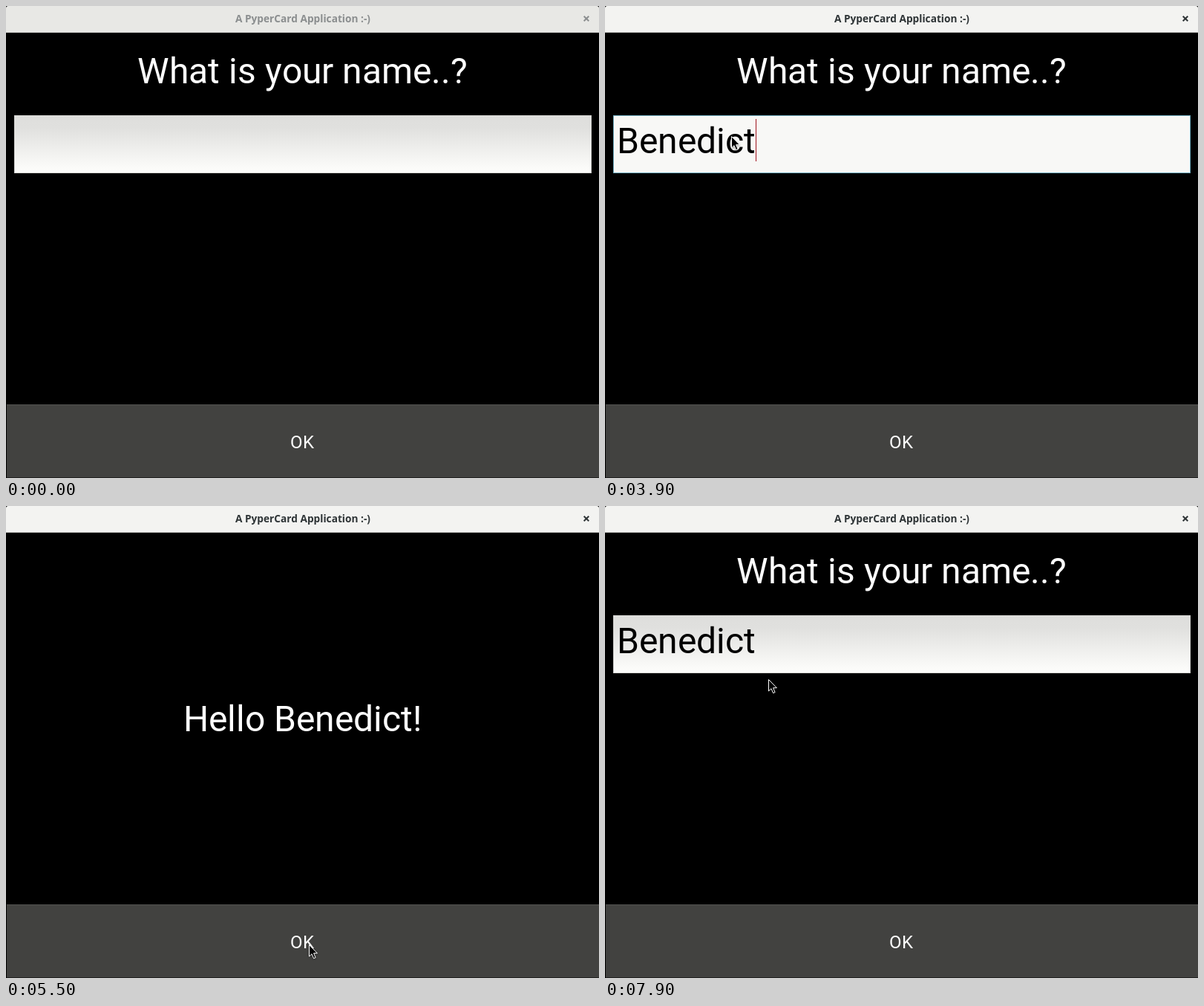
An HTML page for the animation above (8000 ms loop, 799 px wide and 635 px high).

```html
<!DOCTYPE html>
<html lang="en">
<head>
<meta charset="utf-8">
<title>A PyperCard Application</title>
<style>
  html, body { margin: 0; width: 100%; height: 100%; overflow: hidden; background: #000; }
  svg { display: block; }
  text { font: 48px Roboto, sans-serif; white-space: pre; }
  .light { fill: #fff; }
  #title { font: 700 13.7px "Open Sans", "Noto Sans", sans-serif; text-anchor: middle; }
  #ok { font-size: 24px; }
</style>
</head>
<body>
<svg width="799" height="635" viewBox="0 0 799 635">
  <defs>
    <linearGradient id="idle" x1="0" y1="0" x2="0" y2="1">
      <stop offset="0" stop-color="#dededc"/>
      <stop offset=".2" stop-color="#e0e0de"/>
      <stop offset=".92" stop-color="#fbfbf9"/>
      <stop offset="1" stop-color="#fdfdfb"/>
    </linearGradient>
  </defs>
  <rect width="799" height="635"/>

  <path id="bar" d="M0 36V3Q0 0 3 0H796Q799 0 799 3V36Z"/>
  <rect id="barLine" y="35" width="799" height="1"/>
  <text id="title" x="400" y="22">A PyperCard Application :-)</text>
  <path id="close" d="M778.7 13.7l6.6 6.6m0-6.6l-6.6 6.6" stroke-width="2"/>

  <g id="ask">
    <text id="question" class="light" y="104"></text>
    <rect id="field" x="11.5" y="147.5" width="777" height="77"/>
    <text id="typed" y="198"></text>
    <rect id="caret" y="152" width="1" height="57" fill="#a0141e"/>
  </g>
  <text id="hello" class="light" y="303"></text>

  <rect id="button" x="1" y="536" width="798" height="98.5"/>
  <rect x="1" y="536" width="798" height="1" fill="#fff" opacity=".09"/>
  <text id="ok" class="light" y="595"></text>

  <path id="pointer" d="M.5 .5V16L4 12.7L6.6 18.7L9.1 17.6L6.6 11.7H11.4Z"
        stroke="#fff" style="filter: drop-shadow(0 1px 1px #0006)"/>
</svg>
<script>
const LOOP = 8000, TICK = 100, NAME = "Benedict", FIELD_X = 16, CENTRE = 399.5;
const $ = id => document.getElementById(id);
const set = (id, attrs) => {
  for (const key in attrs) $(id).setAttribute(key, attrs[key]);
};
const within = (t, from, to) => t >= from && t < to;
const latest = (table, t) => table.filter(row => row[0] <= t).pop();

// start time, letters shown
const typing = [[0, 0], [3000, 1], [3100, 2], [3200, 3], [3300, 4], [3400, 5], [3600, 7], [3700, 8]];
// start time, visibility of the question, of the greeting, button state
const scenes = [
  [0, 1, 0, "up"],
  [5100, .38, .62, "fade"],
  [5500, 0, 1, "up"],
  [6900, 0, 1, "down"],
  [7000, .62, .38, "fade"],
  [7300, 1, 0, "up"]
];
const buttonFill = { up: "#424240", fade: "#3a5a61", down: "#2d8298" };
const linear = k => k;
const easeOut = k => 1 - (1 - k) ** 1.6;
const easeBoth = k => k * k * (3 - 2 * k);
// start, end, start point, end point, easing; holds until the next row
const moves = [
  [1000, 1600, [99, 39], [170, 177], easeOut],
  [3900, 3900, [170, 175], [170, 175], linear],
  [4100, 4800, [169, 177], [408, 590], easeBoth],
  [7300, 7300, [394, 559], [394, 559], linear],
  [7400, 7900, [394, 559], [220, 233], easeOut]
];

const pen = document.createElement("canvas").getContext("2d");

// Sets text with whole-pixel letter advances, as the toolkit does; returns its end.
function setText(id, text, left) {
  pen.font = getComputedStyle($(id)).font;
  const steps = [...text].map(c => Math.round(pen.measureText(c).width));
  let x = left ?? Math.floor(CENTRE - steps.reduce((a, b) => a + b, 0) / 2);
  const places = steps.map(step => (x += step) - step);
  $(id).textContent = text;
  set(id, { x: places.join(" ") });
  return x;
}

function drawPointer(t) {
  const move = latest(moves, t);
  $("pointer").style.display = move ? "" : "none";
  if (!move) return;
  const [start, end, from, to, ease] = move;
  const k = ease(end > start ? Math.min(1, (t - start) / (end - start)) : 1);
  const [x, y] = from.map((v, i) => Math.round(v + (to[i] - v) * k));
  set("pointer", { transform: `translate(${x} ${y})` });
}

function drawWindow(active) {
  const ink = active ? "#2e3436" : "#8b8e8f";
  set("bar", { fill: active ? "#f3f3f1" : "#e8e8e5" });
  set("barLine", { fill: active ? "#b6b6b3" : "#c8c8c5" });
  set("title", { fill: ink });
  set("close", { stroke: ink });
}

function draw(now) {
  const t = Math.floor((now % LOOP) / TICK) * TICK;
  const [, ask, hello, button] = latest(scenes, t);
  const focused = within(t, 1900, 5500);
  drawWindow(t >= 1900);

  set("ask", { opacity: ask });
  set("hello", { opacity: hello });
  set("button", { fill: buttonFill[button] });
  set("field", focused
    ? { fill: "#f8f8f6", stroke: "#74b0c3" }
    : { fill: "url(#idle)", stroke: "#d6d6d3" });

  const blinkOn = within(t, 1900, 2400) || within(t, 3000, 4200) || within(t, 4700, 5500);
  set("caret", {
    x: setText("typed", NAME.slice(0, latest(typing, t)[1]), FIELD_X),
    visibility: blinkOn ? "visible" : "hidden"
  });
  drawPointer(t);
}

setText("question", "What is your name..?");
setText("hello", `Hello ${NAME}!`);
setText("ok", "OK");
const begin = performance.now();
function frame() {
  draw(performance.now() - begin);
  requestAnimationFrame(frame);
}
frame();
</script>
</body>
</html>
```
